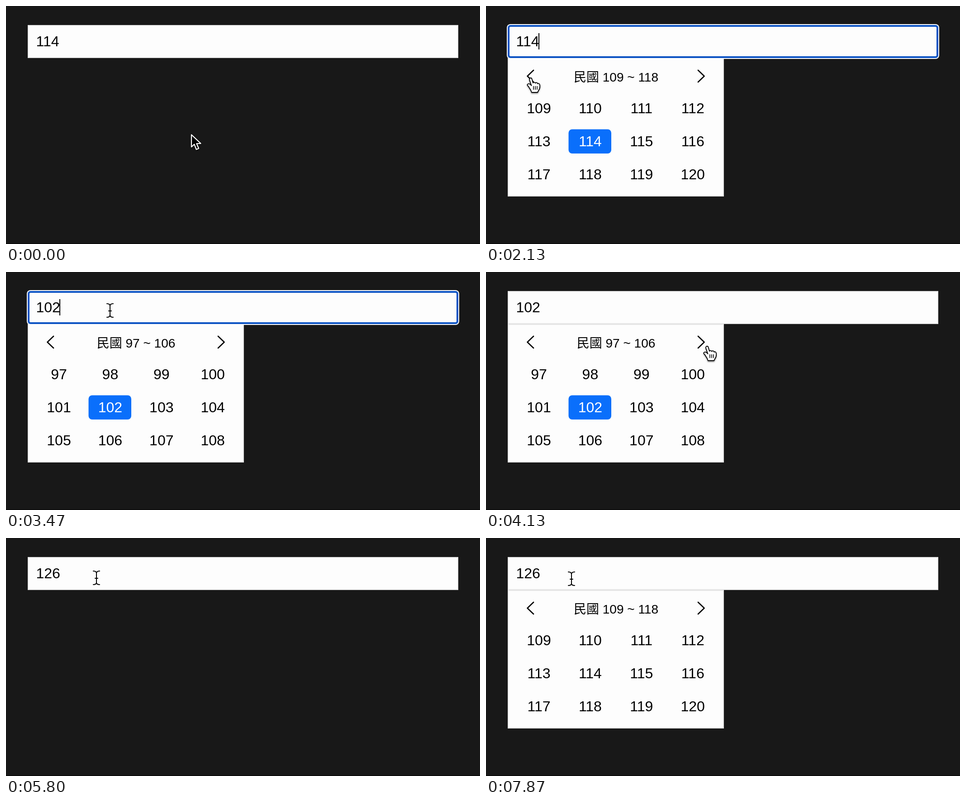
An HTML page for the animation above (8 s loop, 1048x526 px).

```html
<!DOCTYPE html>
<html lang="zh-Hant">
<head>
<meta charset="utf-8">
<title>Year picker</title>
<style>
  html, body { margin: 0; width: 100%; height: 100%; overflow: hidden; background: #181818; }
  svg { display: block; width: 1048px; height: 526px; }
  text { font: 32px "Liberation Sans", Arial, "Noto Sans CJK TC", "Noto Sans CJK", sans-serif; font-kerning: normal; }
  .mid { text-anchor: middle; }
  #title { font-size: 28px; }
  .line { fill: none; stroke: #000; stroke-width: 2.6; stroke-linecap: round; stroke-linejoin: round; }
  .frame { fill: #fdfdfd; stroke: #e6e6e6; stroke-width: 2; }
  .shadow { filter: drop-shadow(0 2px 1.5px rgba(0, 0, 0, .4)); }
</style>
</head>
<body>
<svg viewBox="0 0 1048 526">
  <rect width="1048" height="526" fill="#181818"/>
  <rect y="524" width="1048" height="2" fill="#0e0e0e"/>
  <rect class="frame" x="49" y="43" width="950" height="71"/>
  <g id="panel">
    <rect class="frame" x="49" y="116" width="476" height="304"/>
    <path class="line" d="M105 142L91.5 155 105 168M469 142L482.5 155 469 168"/>
    <text id="title" class="mid" x="287.5" y="167"></text>
    <g id="cells"></g>
  </g>
  <g id="ring">
    <rect x="46" y="40" width="956" height="77" rx="8" fill="#fff"/>
    <rect x="48" y="42" width="952" height="73" rx="6" fill="#0f55c4"/>
    <rect x="52" y="46" width="944" height="65" rx="2" fill="#fdfdfd"/>
  </g>
  <text id="value" x="66.5" y="88.5"></text>
  <rect id="caret" y="60" width="2" height="36"/>
  <g id="arrow" class="shadow">
    <path d="M0 1.5V28.5L6.3 22.6 10.8 34 16 31.8 11.4 21 20.5 20.8Z" stroke="#fff" stroke-width="2.2" stroke-linejoin="round"/>
  </g>
  <g id="hand" class="shadow">
    <g transform="translate(-8 -1)" stroke="#000" stroke-width="1.8" stroke-linejoin="round" stroke-linecap="round">
      <path fill="#fff" d="M9 1C6 1 5.5 4 6.5 6.5L10.5 18C8 15 5 13 2.5 14.5 0 16 2 18 4 20L9 28 11 33H24L26 29C29 25 29.5 20 29 17 28.5 13 26 12.5 24.5 14 24 11 20.5 10.5 19 12.5 18 10 15 10 14 12L11.5 3.5C11 1.5 10 1 9 1Z"/>
      <path d="M15 19.5v7M19 19.5v7M23 19.5v7" stroke-width="1.6"/>
    </g>
  </g>
  <g id="beam" fill="none" stroke="#000" stroke-width="2" stroke-linecap="round">
    <path d="M-7-15Q0-15 0-10V10Q0 15-7 15M7-15Q0-15 0-10M0 10Q0 15 7 15M-3 1H3"/>
  </g>
</svg>
<script>
const LOOP = 8000, STEP = 1000 / 15, TURN_DELAY = 100, PAGE = 12, PICK = 5;
const $ = id => document.getElementById(id);
const show = (id, on) => $(id).style.display = on ? "" : "none";

// Clicks: time, what happens, direction
const clicks = [
  [990, "open"], [2170, "turn", -1], [2860, "pick"],
  [3390, "open"], [4080, "turn", 1], [4560, "turn", 1], [5460, "pick"],
  [5920, "open"], [6630, "turn", -1]
];

// Pointer moves: start, end, x, y
const start = [410, 283];
const moves = [
  [20, 530, 198, 85], [1230, 1800, 98, 159],
  [2300, 2720, 246, 293], [2760, 2930, 262, 278], [2930, 3330, 230, 85],
  [3530, 4130, 488, 164], [4630, 5230, 242, 295],
  [5400, 5800, 200, 88], [6050, 6530, 112, 161], [6540, 6660, 116, 159],
  [6960, 7070, 130, 161], [7220, 7860, 189, 90]
];

function stateAt(t) {
  const s = { value: 114, page: 109, open: false, focus: null };
  for (const [at, what, dir] of clicks) {
    if (at > t) break;
    if (what === "open") {
      Object.assign(s, { open: true, page: s.value - PICK, focus: at });
    } else if (what === "turn") {
      s.focus = null;
      if (t >= at + TURN_DELAY) s.page += dir * PAGE;
    } else {
      Object.assign(s, { open: false, value: s.page + PICK });
    }
  }
  return s;
}

function pointerAt(t) {
  let [x, y] = start;
  for (const [from, to, endX, endY] of moves) {
    if (from > t) break;
    const k = Math.min(1, (t - from) / (to - from)), e = k * k * (3 - 2 * k);
    x += (endX - x) * e;
    y += (endY - y) * e;
  }
  return [x, y];
}

function pointerKind(x, y, open) {
  if (x > 48 && x < 1000 && y > 42 && y < 115) return "beam";
  const onButton = y > 130 && y < 185 && Math.abs(Math.abs(x - 287) - 189) < 38;
  return open && onButton ? "hand" : "arrow";
}

function add(name, attrs) {
  const el = document.createElementNS("http://www.w3.org/2000/svg", name);
  for (const key in attrs) el.setAttribute(key, attrs[key]);
  return $("cells").appendChild(el);
}

const cells = Array.from({ length: PAGE }, (_, i) => {
  const x = 117 + (i % 4) * 113.4, y = 226.5 + Math.floor(i / 4) * 73;
  const box = add("rect", { x: x - 47.9, y: y - 27, width: 94.5, height: 53.5, rx: 8 });
  const label = add("text", { x, y: y + 10.5, class: "mid" });
  return { x, y, box, label };
});

function draw(t) {
  const { value, page, open, focus } = stateAt(t);
  const [x, y] = pointerAt(t);
  const focused = focus !== null;

  $("value").textContent = value;
  $("title").textContent = `民國 ${page} ~ ${page + 9}`;
  cells.forEach((c, i) => {
    const picked = page + i === value;
    const hover = Math.abs(x - c.x) < 47 && Math.abs(y - c.y) < 26.5;
    c.box.setAttribute("fill", picked ? "#0a6ffb" : hover ? "#8ab4fb" : "none");
    c.label.setAttribute("fill", picked || hover ? "#fff" : "#000");
    c.label.textContent = page + i;
  });
  show("panel", open);
  show("ring", focused);
  show("caret", focused && Math.floor((t - focus) / 500) % 2 === 0);
  $("caret").setAttribute("x", Math.round(65 + $("value").getComputedTextLength()));

  const kind = pointerKind(x, y, open);
  for (const id of ["arrow", "hand", "beam"]) show(id, id === kind);
  $(kind).setAttribute("transform", `translate(${x} ${y})`);
}

function tick() {
  const t = performance.now() % LOOP;
  draw(Math.floor((t + 5) / STEP) % (LOOP / STEP) * STEP);
  requestAnimationFrame(tick);
}
tick();
</script>
</body>
</html>
```
